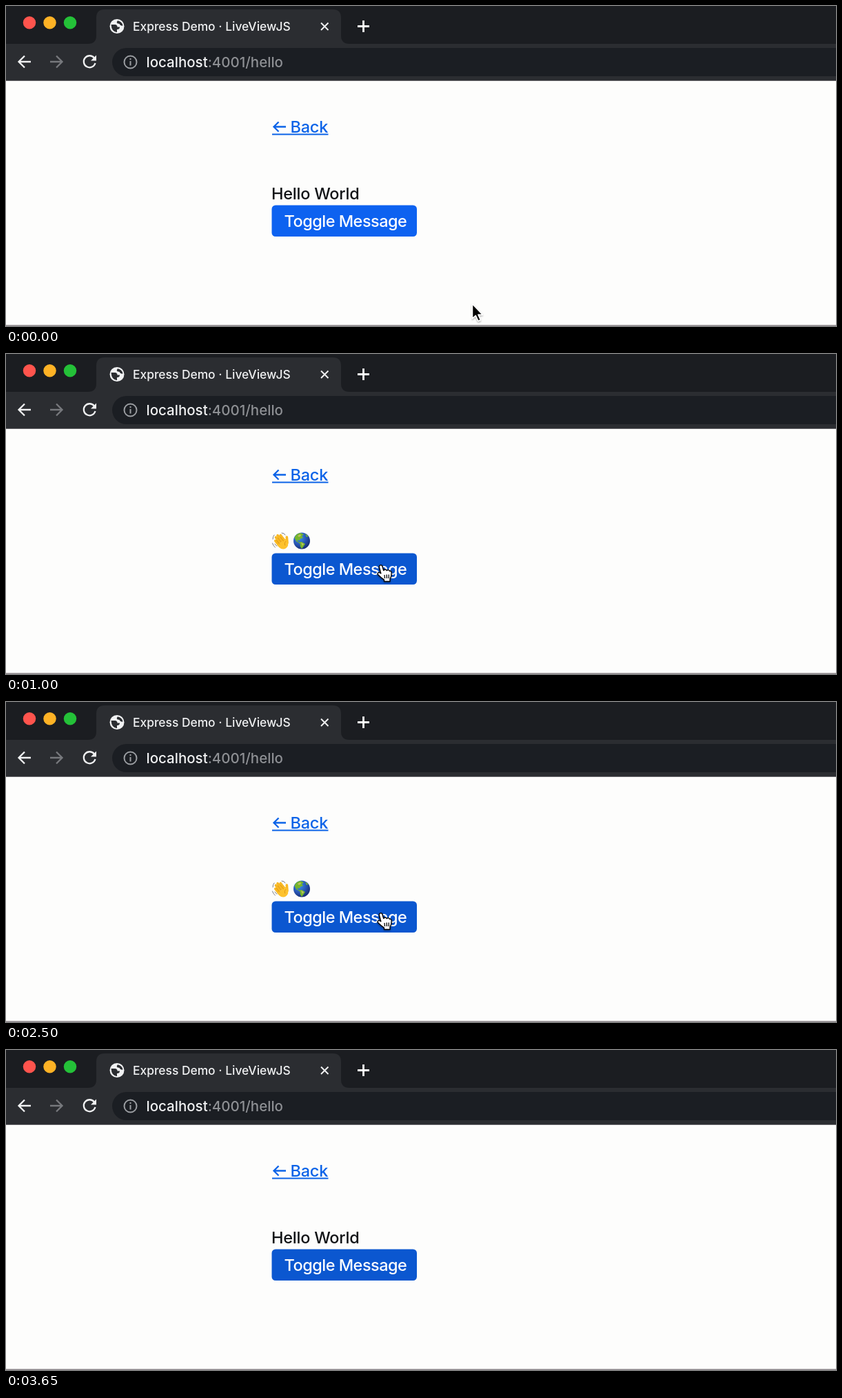
An HTML page for the animation above (3700 ms loop, 1204 by 465 pixels).

```html
<!DOCTYPE html>
<html lang="en">
<head>
<meta charset="utf-8">
<title>Toggle demo</title>
<style>
  html, body { margin: 0; width: 100%; height: 100%; overflow: hidden; background: #fdfdfc; }
  svg { display: block; }
  text { font-family: Inter, "Open Sans", sans-serif; font-size: 23.5px; font-weight: 450; letter-spacing: -.01em; white-space: pre; }
  .line { fill: none; stroke-width: 2.3; }
  .title { font-size: 17.4px; letter-spacing: 0; }
  .url { font-size: 20.5px; letter-spacing: 0; }
  .label { letter-spacing: -.022em; }
</style>
</head>
<body>
<svg width="1204" height="465" viewBox="0 0 1204 465">
  <!-- tab strip and toolbar -->
  <rect width="1204" height="56" fill="#1b1d21"/>
  <path d="M0 55H119Q131 55 131 43V17Q131 5 143 5H474Q486 5 486 17V43Q486 55 498 55H1204V108H0Z" fill="#2b2d31"/>
  <rect y="108" width="1204" height="1" fill="#67666a"/>
  <circle cx="34" cy="24.300" r="9.200" fill="#ff544d"/>
  <circle cx="63.500" cy="24.300" r="9.200" fill="#feb225"/>
  <circle cx="93" cy="24.300" r="9.200" fill="#24c138"/>

  <circle cx="161" cy="29.500" r="10.500" fill="#f1f2f3"/>
  <path d="M152.500 27H158Q161.500 27 161.500 30.500H165Q165 34 161 34V38.200Q153 37.500 152.500 27ZM162 21.300Q159.500 24 162 25.500Q165 25 165.500 27.500Q167 29 169.400 28.500Q168.500 22.500 162 21.300Z" fill="#2b2d31"/>
  <text class="title" x="184" y="35.500" fill="#f0f1f2">Express Demo · LiveViewJS</text>
  <path class="line" d="M457 24.500l10.500 10.500m0-10.500l-10.500 10.500" stroke="#f0f1f2" style="stroke-width:2"/>
  <path class="line" d="M510 29.500h17m-8.500-8.500v17" stroke="#fff" style="stroke-width:2.800"/>

  <path class="line" d="M36 81H18.500m8.500-8.500l-8.500 8.500l8.500 8.500" stroke="#f1f2f3"/>
  <path class="line" d="M64 81h17.500m-8.500-8.500l8.500 8.500l-8.500 8.500" stroke="#77797d"/>
  <path class="line" d="M128 75.500A8.500 8.500 0 1 0 129.500 83" stroke="#f1f2f3"/>
  <path d="M131 71.500V79.500H123Z" fill="#f1f2f3"/>
  <rect x="154" y="61" width="1100" height="41" rx="20.500" fill="#1b1e23"/>
  <circle class="line" cx="180.500" cy="81.500" r="9" stroke="#9a9da1" style="stroke-width:2"/>
  <path d="M179.500 76h2v2.200h-2zm0 4h2v6.500h-2z" fill="#9a9da1"/>
  <text class="url" x="203.500" y="88.500" fill="#f0f1f2">localhost<tspan fill="#8e9094">:4001/hello</tspan></text>

  <!-- page -->
  <path class="line" d="M406 175.500H388.500m7-7l-7 7l7 7" stroke="#0b63e8"/>
  <text x="412.500" y="183.500" fill="#0b63e8">Back</text>
  <rect x="386" y="185.500" width="81.500" height="2" fill="#0b63e8"/>

  <text id="words" x="385" y="280.500" fill="#111316">Hello World</text>
  <g id="emoji">
    <g transform="translate(399 272.500) rotate(-38)">
      <g fill="none" stroke="#f8b823" stroke-width="3.600" stroke-linecap="round">
        <path d="M-5.800 2V-6M-2.200 0V-9.500M1.500 0V-10M5 2V-7.500M6 7L10.500 0"/>
      </g>
      <path d="M-7.500 1H7.500V5Q6 12 0 12Q-6 12 -7.500 5Z" fill="#fdc22e"/>
      <path d="M-4 2V-6M-.400 1V-7.500M3.300 2V-6M6 4Q2 4 1 8" fill="none" stroke="#d58c13" stroke-width=".7"/>
    </g>
    <path d="M387 269q0-4 2-6M386.500 275q1 4 4 6M390 276q1 2 3 3M400 260q4 0 5 3" fill="none" stroke="#7c7d82" stroke-linecap="round"/>
    <circle cx="429" cy="271.500" r="12" fill="url(#sea)"/>
    <path d="M418.500 267Q421 260.500 427 260L432 262L429 264.500L431 267L427 268.500L425.500 271L422 270L424.500 273.500L429 273L434 276L431 280.500L429 283L427 280L426.500 275.500L421 272ZM434 261L438.500 265L436 266Z" fill="#76b52c"/>
    <path d="M428 274l4 2-2 3zM423 264l4-2 1 2-3 2z" fill="#c0bf62"/>
  </g>

  <rect id="button" x="385.500" y="289.500" width="210.500" height="45.500" rx="5.500"/>
  <text class="label" x="403.500" y="321" fill="#fff">Toggle Message</text>
  <rect y="463.500" width="1204" height="1.500" fill="#8d878c"/>

  <g id="arrow" filter="url(#shade)">
    <path d="M.500 0V21L5.300 16.700L9 24.700L12.400 23.200L8.900 15.500H15.300Z" fill="#050505" stroke="#fff" stroke-width="1.500" stroke-linejoin="round"/>
  </g>
  <g id="hand" filter="url(#shade)">
    <path d="M-6.500 3.500C-7.300.300-3.200-1-2 2L-.300 8C1.500 6.200 3.800 6.500 4.300 8.200C6 6.800 8 7.300 8.400 9C10 8.200 11.300 9.500 11.200 12C11.200 16 10.500 18 9 20.300V24H.500V21.700C-2 20-5.500 17-8 14.500C-10 12.300-8 10.300-5.800 11.200L-4.200 12.300Z" fill="#fff" stroke="#050505" stroke-width="1.400" stroke-linejoin="round"/>
    <path d="M1 14.500L1.600 19.500M4.200 14L4.500 19.500M7.300 14L7.200 19.500" stroke="#050505" stroke-width="1.300"/>
  </g>

  <defs>
    <radialGradient id="sea" cx=".35" cy=".3" r=".75">
      <stop stop-color="#3e93e8"/><stop offset=".55" stop-color="#2857b7"/><stop offset="1" stop-color="#162b70"/>
    </radialGradient>
    <filter id="shade" x="-50%" y="-50%" width="200%" height="200%">
      <feDropShadow dx="0" dy="1.500" stdDeviation="1.200" flood-opacity=".35"/>
    </filter>
  </defs>
</svg>
<script>
  const LOOP = 3700, STEP = 50, MOVE = 250, HOVER = 150, LEAVE = 2900;
  const toggles = [650, 1250, 1900, 2900];
  const from = [676, 433], to = [548, 306.5];
  const idle = [13, 98, 240], active = [11, 87, 208];
  const $ = id => document.getElementById(id);
  const [words, emoji, button, arrow, hand] = ["words", "emoji", "button", "arrow", "hand"].map($);
  const clamp = v => Math.min(1, Math.max(0, v));
  const mix = (a, b, k) => a.map((v, i) => v + (b[i] - v) * k);
  const show = (el, on) => el.setAttribute("visibility", on ? "visible" : "hidden");

  function draw(t) {
    const flipped = toggles.filter(v => t >= v).length % 2 === 1;
    show(words, !flipped);
    show(emoji, flipped);

    const ease = 1 - (1 - clamp(t / MOVE)) ** 2;
    const place = `translate(${mix(from, to, ease)})`;
    arrow.setAttribute("transform", place);
    hand.setAttribute("transform", place);
    show(arrow, t < HOVER);
    show(hand, t >= HOVER && t < LEAVE);
    button.setAttribute("fill", `rgb(${mix(idle, active, clamp((t - 100) / 150)).map(Math.round)})`);
  }

  const start = performance.now();
  function tick() {
    const t = (performance.now() - start) % LOOP;
    draw(Math.floor(t / STEP) * STEP);
    requestAnimationFrame(tick);
  }
  draw(0);
  requestAnimationFrame(tick);
</script>
</body>
</html>
```
